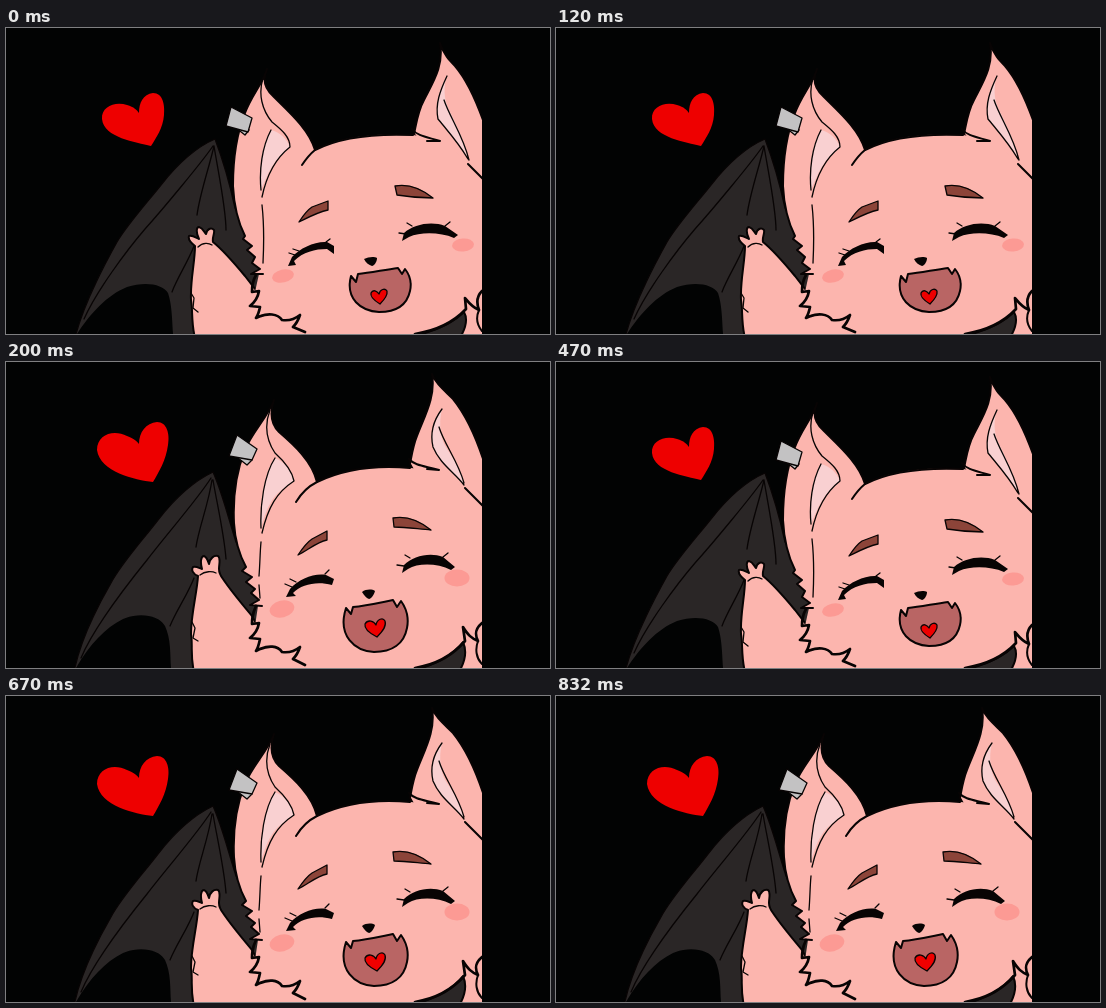
Animation of 544x306 px, one loop 0.94 s. Source, as an HTML page:

```html
<!DOCTYPE html>
<html lang="en">
<head>
<meta charset="utf-8">
<title>Happy bat</title>
<style>
html, body { margin: 0; width: 100%; height: 100%; overflow: hidden; background: #020303; }
svg { display: block; width: 100%; height: 100%; }
path, ellipse { fill: none; stroke: none; }
.line { stroke: #080404; stroke-width: 2; stroke-linecap: round; stroke-linejoin: round; }
.thin { stroke-width: 1.3; }
.bold { stroke-width: 2.7; }
.red { fill: #ee0000; }
.wing { fill: #2a2626; }
.void { fill: #020303; }
.skin { fill: #fcb5ae; }
.inner { fill: #f9d0d1; }
.tag { fill: #c3c2c3; }
.brow { fill: #8c4439; }
.ink { fill: #080404; }
.blush { fill: #fc9a94; }
.mouth { fill: #b96564; }
.low, .high { animation: low 470ms step-end infinite; }
.high { animation-name: high; }
/* 200 ms low, 270 ms high */
@keyframes low { 0% { visibility: visible; } 42.553%, 100% { visibility: hidden; } }
@keyframes high { 0% { visibility: hidden; } 42.553%, 100% { visibility: visible; } }
</style>
</head>
<body>
<svg viewBox="0 0 544 306">
<defs><clipPath id="panel"><path d="M68 0H476V306H68Z"/></clipPath></defs>
<g clip-path="url(#panel)">

<g class="low">
  <path class="red" d="M145 118C130 114 98 110 96 91C95 78 110 73 121 77C128 79 131 82 133 85C133 75 137 66 147 65C157 65 159 77 158 87C157 100 150 110 145 118Z"/>
  <!-- wing -->
  <path class="wing line thin" d="M209 111C188 120 170 138 155 157C139 177 121 197 111 214C96 241 77 277 69 310H190L252 268L256 238L229 180C224 157 217 132 209 111Z"/>
  <path class="void" d="M71 306C84 286 101 267 121 259C139 253 157 256 162 265C166 277 166 291 167 306Z"/>
  <path class="line thin" d="M207 118C196 134 157 181 139 201C121 222 91 262 78 291M208 118C203 140 194 165 191 187M208 118C212 143 220 180 220 202M188 218C182 234 171 250 166 264"/>
  <!-- arm -->
  <path class="skin line" d="M189 310C185 294 187 283 185 272C184 253 189 234 189 218C185 215 182 211 183 208C187 207 190 210 193 211C190 205 190 199 193 199C197 200 198 204 200 206C201 201 205 199 208 202C209 205 206 209 207 214C217 222 229 236 239 248L253 266L300 310Z"/>
  <path class="line thin" d="M192 219C197 214 203 215 206 217M185 265L188 270L187 280L192 284"/>
  <!-- right ear -->
  <path class="skin line" d="M408 106C411 92 412 83 418 72C427 54 438 38 434 15C438 27 443 32 449 38C461 52 470 72 478 95V150H440Z"/>
  <path class="inner" d="M440 50C434 63 429 76 432 91C440 101 452 114 462 131C459 113 451 99 444 84C439 75 437 64 440 50Z"/>
  <path class="line thin" d="M441 48C434 63 429 76 432 91C440 101 452 114 462 131M438 72C444 90 457 107 463 132"/>
  <!-- head and left ear -->
  <path class="skin" d="M261 41C257 55 245 68 239 85C229 110 227 137 227 158C228 179 232 194 239 208L237 211L246 218L241 222L249 229L246 235L254 241L245 246L253 246L249 264V310H478V150L462 137L440 112L407 107C360 105 330 111 309 122C303 101 282 83 267 68C258 60 257 50 261 41Z"/>
  <path class="inner" d="M265 102C255 119 253 142 255 162C263 143 267 134 277 126L284 119C281 111 274 104 265 102Z"/>
  <path class="line" d="M239 208C232 194 228 179 227 158C227 137 229 110 239 85C245 68 257 55 261 41C257 50 258 60 267 68C282 83 303 101 309 122M239 208L237 211L246 218L241 222L249 229L246 235L254 241L245 246L257 246"/>
  <path class="line thin" d="M257 50C252 66 256 82 266 94C276 102 284 109 284 119C270 130 261 145 256 169M265 102C256 119 253 142 255 162M256 177C258 195 258 215 257 235"/>
  <path class="line" d="M296 137C300 131 304 126 309 122C330 111 360 105 407 107M406 101C411 108 421 109 434 113L421 113M462 136L477 151"/>
  <path class="tag line thin" d="M230 100L239 107L243 102L238 96Z"/>
  <path class="tag line thin" d="M225 79L246 90L242 104L220 98Z"/>
  <!-- face -->
  <path class="brow line thin" d="M293 194C297 188 300 183 306 179L322 173L322 182C312 184 303 189 293 194Z"/>
  <path class="brow line thin" d="M389 158C405 155 417 162 427 170C415 170 403 169 391 167Z"/>
  <path class="ink" d="M282 238L286 229C294 220 309 213 321 214L328 218L328 226L321 221C309 221 297 224 288 233L290 237Z"/>
  <path class="line thin" d="M283 225L289 227M287 221L293 223M320 214L324 211"/>
  <path class="ink" d="M396 213L398 205C408 196 426 193 439 198L452 207L448 210C434 204 414 204 403 209Z"/>
  <path class="line thin" d="M393 205L400 206M401 195L406 198M439 198L444 194"/>
  <ellipse class="blush" cx="277" cy="248" rx="11" ry="6.5" transform="rotate(-13 277 248)"/>
  <ellipse class="blush" cx="457" cy="217" rx="11" ry="6.5" transform="rotate(-5 457 217)"/>
  <path class="ink" d="M358 231C362 229 368 228 371 230C371 234 368 238 366 238C363 237 360 235 358 231Z"/>
  <path class="mouth line" d="M345 248L350 254L352 246C364 245 377 242 392 240L396 246L399 241C403 246 406 254 404 263C401 277 390 284 373 284C355 283 339 271 345 248Z"/>
  <path class="red line thin" d="M374 276C369 273 364 269 365 265C367 261 371 263 373 266C374 261 379 260 381 263C382 268 377 273 374 276Z"/>
  <!-- fur and collar -->
  <path class="wing line" d="M409 308C428 303 446 296 458 284C462 291 460 299 455 308Z"/>
  <path class="line bold" d="M409 306C428 303 446 296 460 281L459 270C463 275 466 279 473 282C470 274 471 268 476 263"/>
  <path class="line bold" d="M250 247C247 252 246 258 246 264L253 263C252 269 249 274 244 278L254 279C253 284 252 287 250 290C262 284 272 286 276 292C283 293 289 291 294 287C292 293 290 296 287 299L299 304"/>
  <path class="line" d="M473 282C470 289 471 297 476 303"/>
</g>

<g class="high">
  <path class="red" d="M147 120C129 118 94 110 91 88C91 72 108 67 121 74C128 77 131 79 133 82C133 70 140 61 151 60C161 60 164 72 162 83C160 98 153 110 147 120Z"/>
  <!-- wing -->
  <path class="wing line thin" d="M207 110C184 121 166 140 152 158C135 180 115 202 105 221C90 247 74 279 68 310H190L252 268L255 235L230 180C222 155 216 130 207 110Z"/>
  <path class="void" d="M70 306C84 282 99 266 117 257C133 250 153 253 159 264C165 277 164 291 165 306Z"/>
  <path class="line thin" d="M205 116C191 138 160 173 141 198C120 224 88 265 75 296M206 118C202 144 193 165 190 185M207 118C211 142 218 171 220 197M188 216C182 232 170 249 164 264"/>
  <!-- arm -->
  <path class="skin line" d="M188 310C184 293 187 283 185 272C185 252 191 231 192 214C187 212 185 208 187 205C190 204 193 206 196 207C194 200 195 194 198 194C201 195 202 199 203 202C204 196 208 193 212 194C215 196 213 202 213 207C213 211 214 213 217 217C225 229 236 242 246 254L252 265L300 310Z"/>
  <path class="line thin" d="M194 213C199 209 206 209 210 211M186 260L189 266L187 276L192 279"/>
  <!-- right ear -->
  <path class="skin line" d="M404 102C406 92 407 84 411 74C418 55 430 35 426 12C430 22 438 28 447 37C460 53 470 75 478 100V150H430Z"/>
  <path class="inner" d="M436 47C427 59 424 72 427 85C434 102 448 110 458 123C457 111 449 99 441 87C435 79 432 62 436 47Z"/>
  <path class="line thin" d="M436 47C427 59 424 72 427 85C434 102 448 110 458 123M433 65C438 82 452 99 458 121"/>
  <!-- head and left ear -->
  <path class="skin" d="M268 38C262 55 246 70 239 88C229 113 227 140 228 161C229 179 233 192 240 205L236 209L246 215L240 220L249 227L245 231L253 238L244 243L252 244L249 264V310H478V143L459 127L433 108L404 106C360 102 332 110 311 120C306 99 288 83 273 70C265 62 264 50 268 38Z"/>
  <path class="inner" d="M269 96C258 113 254 143 255 166C261 145 266 135 277 127L288 119C286 109 279 100 269 96Z"/>
  <path class="line" d="M240 205C233 192 229 179 228 161C227 140 229 113 239 88C246 70 262 55 268 38C264 50 265 62 273 70C288 83 306 99 311 120M240 205L236 209L246 215L240 220L249 227L245 231L253 238L244 243L256 244"/>
  <path class="line thin" d="M264 48C258 64 261 79 269 91C279 100 286 109 288 119C271 130 262 145 256 171M269 96C258 113 254 143 255 166M255 180C254 190 254 202 253 214M253 223L254 236"/>
  <path class="line" d="M290 140C296 130 303 124 311 120C332 110 360 102 404 106M403 97C409 104 420 104 433 108L421 107M459 126L477 144"/>
  <path class="tag line thin" d="M232 96L241 103L246 98L241 93Z"/>
  <path class="tag line thin" d="M231 73L251 87L246 98L223 94Z"/>
  <!-- face -->
  <path class="brow line thin" d="M292 193C296 187 300 181 306 177L321 169L321 178C311 180 302 188 292 193Z"/>
  <path class="brow line thin" d="M387 156C403 153 415 160 425 168C412 167 400 165 388 165Z"/>
  <path class="ink" d="M280 235L284 227C293 217 308 211 320 213L328 217L326 223C311 219 296 222 287 231L290 234Z"/>
  <path class="line thin" d="M279 222L286 225M284 217L290 220M319 212L323 208"/>
  <path class="ink" d="M396 211L398 203C407 194 424 190 437 195L449 205L445 208C431 201 412 201 402 207Z"/>
  <path class="line thin" d="M391 203L398 204M399 193L404 196M437 195L442 191"/>
  <ellipse class="blush" cx="276" cy="247" rx="12.5" ry="8.5" transform="rotate(-13 276 247)"/>
  <ellipse class="blush" cx="451" cy="216" rx="12.5" ry="8.5"/>
  <path class="ink" d="M356 230C360 227 366 227 369 229C368 233 365 237 363 237C360 236 358 233 356 230Z"/>
  <path class="mouth line" d="M340 246L345 252L347 245C359 244 372 241 387 238L391 245L395 239C400 246 403 256 401 266C398 282 386 290 368 290C349 289 331 274 340 246Z"/>
  <path class="red line thin" d="M371 275C365 272 358 267 359 262C362 257 368 259 370 263C371 257 377 255 379 259C381 265 375 271 371 275Z"/>
  <!-- fur and collar -->
  <path class="wing line" d="M409 308C428 303 446 294 457 280C461 289 459 299 454 308Z"/>
  <path class="line bold" d="M409 306C428 303 446 294 459 279L457 265C462 273 465 276 472 279C468 271 470 266 476 261"/>
  <path class="line bold" d="M250 244C247 250 246 256 246 262L253 261C252 267 249 272 244 276L254 277C253 282 252 286 250 289C263 282 272 284 276 290C283 291 289 289 294 285C292 291 290 294 287 297L299 303"/>
  <path class="line" d="M472 279C469 287 470 296 476 302"/>
</g>

</g>
</svg>
</body>
</html>
```
